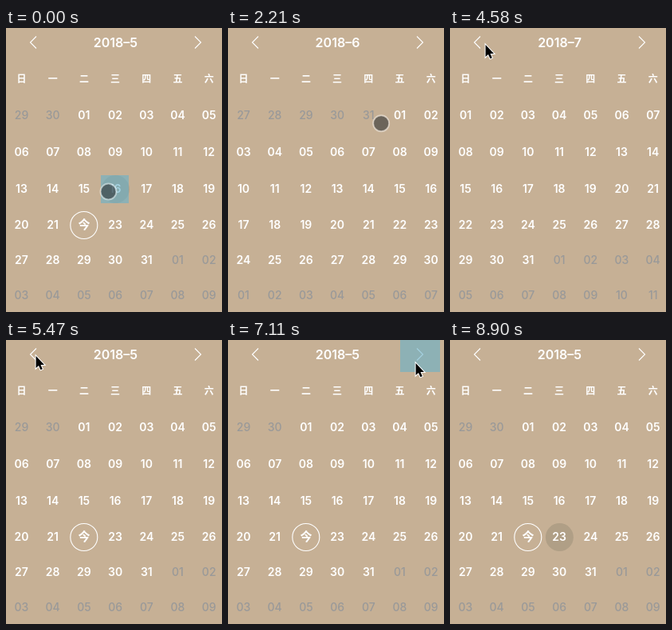
An HTML page that plays this animation: 271x355 px, repeating every 9.05 s.

```html
<!DOCTYPE html>
<html lang="zh">
<head>
<meta charset="utf-8">
<title>Calendar</title>
<style>
  html, body { margin: 0; width: 100%; height: 100%; overflow: hidden; background: #c6b095; }
  svg { display: block; }
  text { font: 600 14px Inter, "Noto Sans CJK SC", "Noto Sans CJK", sans-serif; fill: #fff; text-anchor: middle; }
  .title { font-size: 16px; }
  .week { font: 700 12px "Noto Sans CJK SC", "Noto Sans CJK", sans-serif; }
  .now { font: 700 15px "Noto Sans CJK SC", "Noto Sans CJK", sans-serif; }
  .off { font-weight: 500; fill: #999; }
  .line { fill: none; stroke: #fff; stroke-width: 1.1; }
  .picked { fill: #b09f86; }
  .tap { fill: rgba(104, 178, 204, .6); }
  .arrow { stroke: #fff; stroke-width: 2; paint-order: stroke; }
</style>
</head>
<body>
<svg width="271" height="355" viewBox="0 0 271 355">
  <rect width="271" height="355" fill="#c6b095"/>
  <circle id="picked" class="picked" r="17.5"/>
  <path class="line" d="M38 10.5L30.5 18L38 25.5M237 10.5L244.5 18L237 25.5"/>
  <text id="title" class="title" x="137.5" y="24"/>
  <g id="week"></g>
  <circle id="today" class="line" cx="97.8" cy="246.5" r="17"/>
  <g id="days"></g>
  <rect id="tap" class="tap"/>
  <g id="touch">
    <circle r="9.5" fill="rgba(42,44,48,.58)"/>
    <circle r="10" fill="none" stroke="rgba(255,255,255,.42)" stroke-width="2"/>
  </g>
  <path id="arrow" class="arrow" d="M.6 .6V15.6L4 12.4L6.4 17.8L8.8 16.8L6.5 11.5H11Z"/>
</svg>
<script>
const LOOP = 9050, FRAMES = 61, LEAD = 30;
const ROWS = [109, 155, 201, 246, 290, 334];
const colX = c => 19.5 + c * 39.2;
const $ = id => document.getElementById(id);

// The visitor's session, written as a script; time is counted in frames.
const taps = [], moves = [];
let clock = 0, pos = [128.5, 204.5];
const wait = n => { clock += n; };
const pick = (col, row) => taps.push({ frame: clock, turn: 0, cell: [col, row] });
const turn = n => taps.push({ frame: clock, turn: n, cell: null });
function move(n, ...to) {
  moves.push({ start: clock, n, from: pos, to });
  pos = to;
  clock += n;
}

pick(3, 2);
move(2, 165, 204);
wait(2);
pick(4, 2);
move(4, 235.5, 25.5);
wait(2);
turn(1);
wait(3);
move(3, 177, 152);
pick(4, 1);
move(2, 212, 153);
pick(5, 1);
move(3, 231, -14.5);
const arrowFrom = clock;
move(2, 237, 18);
turn(1);
wait(1);
move(7, 44, 20.5);
move(2, 37, 19.5);
turn(-1);
wait(3);
turn(-1);
wait(4);
turn(-1);
wait(3);
move(3, 238, 20);
wait(1);
move(1, 235, 28.5);
turn(1);
move(5, 138, 242);
wait(2);
pick(3, 3);
wait(1);
move(4, 205, 380);

const show = (el, on) => el.setAttribute("visibility", on ? "visible" : "hidden");
const set = (el, attrs) => { for (const k in attrs) el.setAttribute(k, attrs[k]); };
const label = (x, y, cls, s) => `<text x="${x}" y="${y}" class="${cls}">${s}</text>`;
const ease = u => u * u * (3 - 2 * u);

$("week").innerHTML = [..."日一二三四五六"].map((s, c) => label(colX(c), 67.7, "week", s)).join("");

let shown = 0;
function drawMonth(month) {
  if (month === shown) return;
  shown = month;
  $("title").textContent = `2018–${month}`;
  show($("today"), month === 5);
  const lead = new Date(2018, month - 1, 1).getDay();
  let out = "";
  for (let i = 0; i < 42; i++) {
    const date = new Date(2018, month - 1, 1 - lead + i);
    const day = date.getDate();
    const inside = date.getMonth() === month - 1;
    const isToday = month === 5 && inside && day === 22;
    const cls = isToday ? "now" : inside ? "" : "off";
    const s = isToday ? "今" : String(day).padStart(2, "0");
    out += label(colX(i % 7), ROWS[Math.floor(i / 7)] + 5, cls, s);
  }
  $("days").innerHTML = out;
}

function drawTap({ turn, cell }) {
  if (cell) set($("tap"), { x: Math.round(colX(cell[0]) - 18), y: ROWS[cell[1]] - 17, width: 35, height: 35 });
  else set($("tap"), { x: turn > 0 ? 216 : 9, y: 0, width: 50, height: 40 });
}

function drawPointer(frame) {
  const { start, n, from, to } = moves.findLast(m => m.start <= frame);
  const u = ease(Math.min(1, (frame - start) / n));
  const [x, y] = from.map((a, i) => a + (to[i] - a) * u);
  const isArrow = frame >= arrowFrom;
  show($("arrow"), isArrow);
  show($("touch"), !isArrow);
  set($(isArrow ? "arrow" : "touch"), { transform: `translate(${x} ${y})` });
}

function render(t) {
  const frame = Math.min(FRAMES - 1, Math.floor((t + LEAD) * FRAMES / LOOP));
  const done = taps.filter(p => p.frame <= frame);
  const last = done[done.length - 1];

  drawMonth(done.reduce((m, p) => m + p.turn, 5));
  show($("picked"), last.cell);
  if (last.cell) set($("picked"), { cx: colX(last.cell[0]) + .3, cy: ROWS[last.cell[1]] + .5 });

  show($("tap"), last.frame === frame);
  drawTap(last);
  drawPointer(frame);
}

const begin = performance.now();
function tick() {
  render((performance.now() - begin) % LOOP);
  requestAnimationFrame(tick);
}
tick();
</script>
</body>
</html>
```
